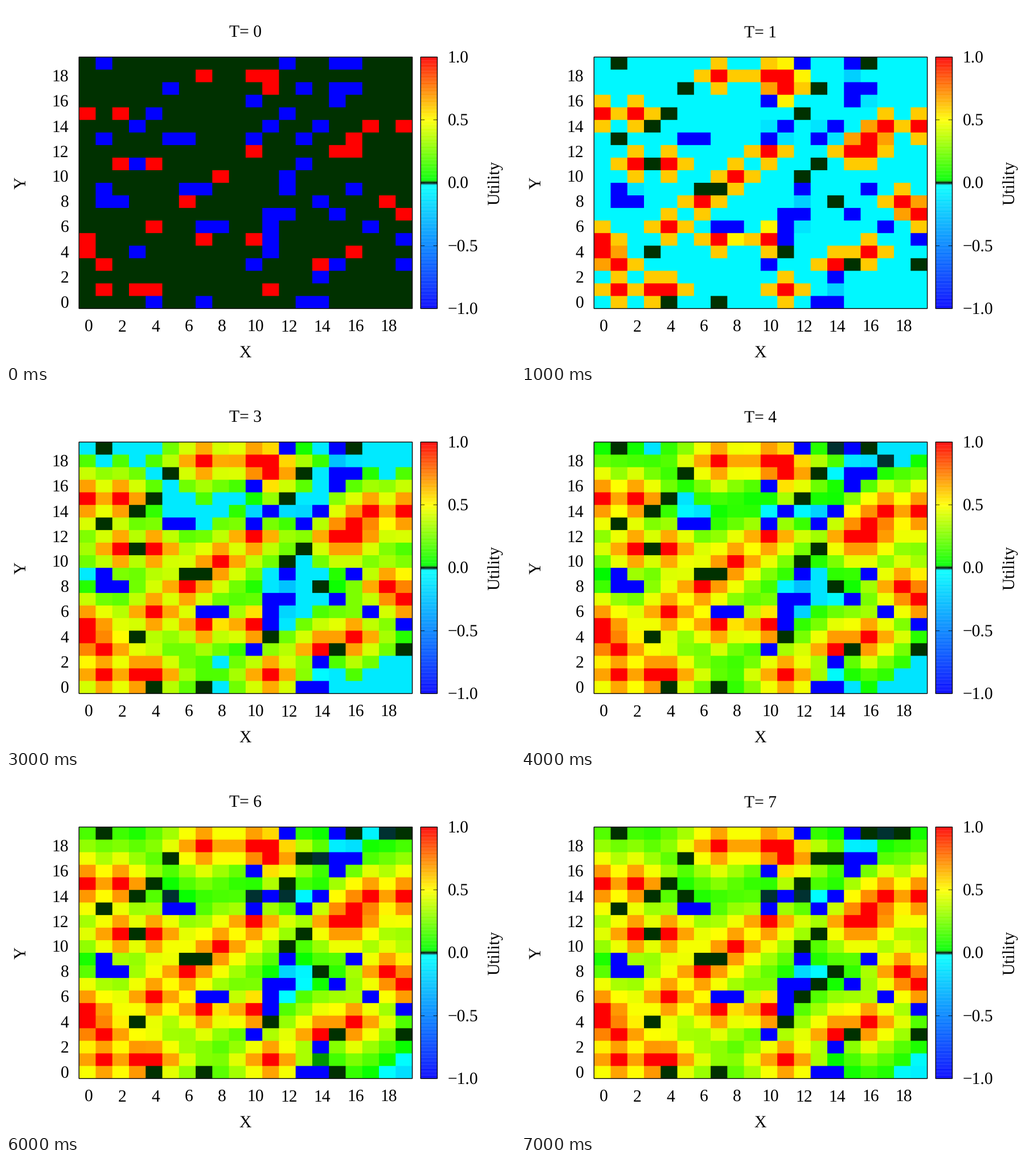
A matplotlib script that plays this animation: 894 px wide and 626 px high, repeating every 8000 ms.

```python
import numpy as np
import matplotlib.pyplot as plt
from matplotlib.animation import FuncAnimation
from matplotlib.patches import Rectangle

W, H, DPI = 894, 626, 100
LEFT, RIGHT, TOP, BOTTOM = 128.2, 713.6, 89.5, 530.5
BAR_L, BAR_R = 728.3, 757.5
FONT_PX = 29.6
N = 20
STEPS = 8

# Grid world: R = goal (+1), B = pit (-1), # = wall
WORLD = [
    ".#..........B..B#...",
    ".......R..RR........",
    ".....#.....R.#.BB...",
    "..........B....B....",
    "R.R.#.......#.......",
    "...#.......B..B..R.R",
    ".#...BB...B..B..R...",
    "..........R....RR...",
    "..R#R........#......",
    "........R...#.......",
    ".B....##....B...B...",
    ".BB...R.......#...R.",
    "...........BB..B...R",
    "....R..BB..B.....B..",
    "R......R..RB.......B",
    "R..#.......#....R...",
    ".R........B...R#...#",
    "..............B.....",
    ".R.RR......R........",
    "....#..#.....BB.....",
]
GAMMA, STEP_COST = 0.8, -0.04
MOVES = [(-1, 0), (0, 1), (1, 0), (0, -1)]

cells = np.array([list(row) for row in WORLD])
free, wall = cells == ".", cells == "#"


def neighbour(u, move):
    """Utility reached by a move; walls and borders bounce back."""
    rows, cols = (slice(1 + d, 1 + d + N) for d in move)
    value = np.pad(u, 1, mode="edge")[rows, cols]
    blocked = np.pad(wall, 1)[rows, cols]
    return np.where(blocked, u, value)


def update(u):
    near = [neighbour(u, m) for m in MOVES]
    q = [0.8 * near[i] + 0.1 * near[i - 1] + 0.1 * near[(i + 1) % 4]
         for i in range(4)]
    return np.where(free, GAMMA * np.max(q, axis=0) + STEP_COST, u)


def palette(v):
    """Blue - cyan - black - green - yellow - red in 256 levels."""
    level = np.clip(np.floor((np.asarray(v) + 1) / 2 * 256), 0, 255)
    v = level / 255 * 2 - 1
    stops = [-1, -0.02, 0, 0.02, 0.5, 1]
    red = np.interp(v, stops, [0, 0, 0, 0, 1, 1])
    green = np.interp(v, stops, [0, 1, 0, 1, 1, 0])
    blue = np.interp(v, stops, [1, 1, 0, 0, 0, 0])
    return np.stack([red, green, blue], axis=-1)


def coverage(start, stop):
    """Share of each whole pixel that each of the N cells covers."""
    pixel = np.arange(int(start), int(np.ceil(stop)))[:, None]
    edge = np.linspace(start, stop, N + 1)
    share = np.clip(np.minimum(edge[1:], pixel + 1)
                    - np.maximum(edge[:-1], pixel), 0, None)
    return share / share.sum(axis=1, keepdims=True)


ROWS, COLS = coverage(TOP, BOTTOM), coverage(LEFT, RIGHT)


def render(rgb):
    """Paint the cells with smooth edges at their exact positions."""
    return np.clip(np.einsum("yr,rck,xc->yxk", ROWS, rgb, COLS,
                             optimize=True), 0, 1)


utility = np.select([cells == "R", cells == "B"], [1.0, -1.0], 0.0)
history = [utility]
for _ in range(STEPS - 1):
    history.append(update(history[-1]))
colours = [palette(u) for u in history]
colours[0][wall] = palette(-1)  # walls start out blue
images = [render(c) for c in colours]

plt.rcParams["font.family"] = "Liberation Serif"
plt.rcParams["text.hinting"] = "none"
fig = plt.figure(figsize=(W / DPI, H / DPI), dpi=DPI, facecolor="white")
ax = fig.add_axes([0, 0, 1, 1])


def px(n):
    return n * 72 / DPI


def label(x, y, s, ha="center", rotation=0):
    return ax.text(x, y, s, ha=ha, va="baseline", rotation=rotation,
                   rotation_mode="anchor", fontsize=px(FONT_PX), color="black")


def outline(x0, x1):
    ax.add_patch(Rectangle((x0, TOP), x1 - x0, BOTTOM - TOP, fill=False,
                           ec="black", lw=px(1.4), snap=False, zorder=3))


x0, y0 = int(LEFT), int(TOP)
grid = ax.imshow(images[0], extent=(x0, x0 + len(COLS), y0 + len(ROWS), y0),
                 interpolation="nearest", aspect="auto")

# Colour bar
edges = np.linspace(BOTTOM, TOP, 257)
shades = palette(np.linspace(-1, 1, 256))
for low, high, shade in zip(edges, edges[1:], shades):
    ax.add_patch(Rectangle((BAR_L, high), BAR_R - BAR_L, low - high,
                           fc=shade, lw=0, snap=False))
outline(LEFT, RIGHT)
outline(BAR_L, BAR_R)

DROP = 10  # from digit centre to baseline
for v in (-1, -0.5, 0, 0.5, 1):
    y = BOTTOM - (v + 1) / 2 * (BOTTOM - TOP)
    label(775.7, y + DROP, f"{v:.1f}".replace("-", "\u2212"), ha="left")
    for a, b in ((BAR_L, BAR_L + 6.5), (BAR_R - 6.5, BAR_R)):
        ax.plot([a, b], [y, y], color="black", lw=px(0.8), snap=False)

for n in range(0, N, 2):
    label(LEFT + (n + 0.5) * (RIGHT - LEFT) / N + 2.7, 571, str(n))
    label(110.5, BOTTOM - (n + 0.5) * (BOTTOM - TOP) / N + DROP, str(n),
          ha="right")

title = label(421, 55, "T= 0")
label(420.2, 615.5, "X")
label(34.5, 310, "Y", rotation=90)
label(867, 310.5, "Utility", rotation=90)

ax.set_xlim(0, W)
ax.set_ylim(H, 0)
ax.axis("off")


def draw(t):
    grid.set_data(images[t])
    title.set_text(f"T= {t}")
    return grid, title


anim = FuncAnimation(fig, draw, frames=STEPS, interval=1000, repeat=True,
                     repeat_delay=0, blit=False)
plt.show()
```
